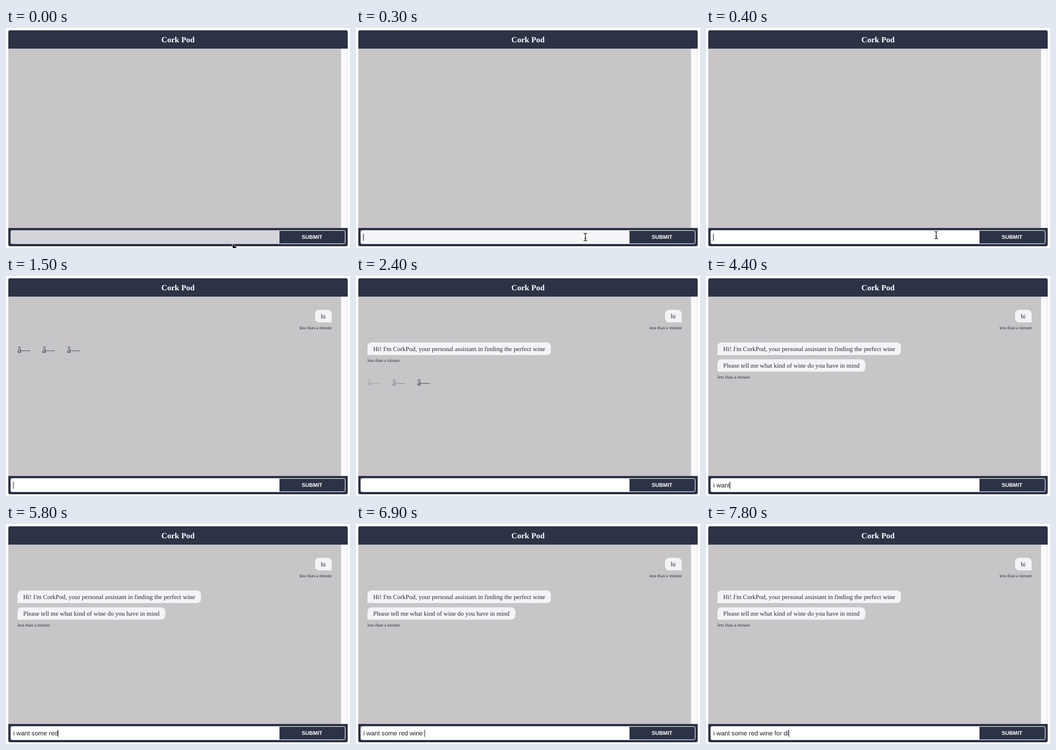
These frames come from a looping animation (600 px wide and 384 px high, 8 s). An HTML page:

```html
<!DOCTYPE html>
<html lang="en">
<head>
<meta charset="utf-8">
<title>Cork Pod</title>
<style>
  html, body { margin: 0; width: 100%; height: 100%; overflow: hidden; background: #fff; }
  svg { display: block; width: 600px; height: 384px; }
  text { text-rendering: geometricPrecision; white-space: pre; }
  .serif { font-family: "Liberation Serif", "Times New Roman", serif; }
  .sans { font-family: "Liberation Sans", Arial, sans-serif; }
  .msg { font-size: 11.05px; fill: #292b38; }
  .time { font-size: 7.85px; fill: #2e2e36; }
  .dot { font-size: 15.3px; fill: #2d3446; }
  .bubble { fill: #f4f3f6; }
</style>
</head>
<body>
<svg viewBox="0 0 600 384">
  <rect width="600" height="384" fill="#fff"/>
  <rect x="584" y="36" width="12" height="313" fill="#faf9fb"/>
  <path d="M584.5 36V349M595.5 36V349" stroke="#e6e4e8"/>
  <rect x="4" y="36" width="580" height="313" fill="#c7c5c8"/>
  <path d="M4 36V7q0-3 3-3H593q3 0 3 3V36Z" fill="#2d3346"/>
  <path d="M4 349H596V378q0 3-3 3H7q-3 0-3-3Z" fill="#2d3346"/>
  <text class="serif" x="300" y="24.5" font-size="14" font-weight="700" fill="#fff" text-anchor="middle">Cork Pod</text>

  <g class="serif">
    <g id="user">
      <path class="bubble" d="M547 59H560q8 0 8 8V81H547q-8 0-8-8V67q0-8 8-8Z"/>
      <text class="msg" x="549" y="73.5">hi</text>
      <text class="time" x="568.3" y="92.5" text-anchor="end">less than a minute</text>
    </g>
    <g id="hello">
      <path class="bubble" d="M20 138V124q0-8 8-8H332q8 0 8 8V130q0 8-8 8Z"/>
      <text class="msg" x="30" y="130.5">Hi! I'm CorkPod, your personal assistant in finding the perfect wine</text>
    </g>
    <g id="ask">
      <path class="bubble" d="M20 167V153.500q0-8 8-8H270q8 0 8 8V159q0 8-8 8Z"/>
      <text class="msg" x="30" y="160">Please tell me what kind of wine do you have in mind</text>
    </g>
    <text id="stamp" class="time" x="20" y="149.500">less than a minute</text>
    <g id="dots">
      <text class="dot" x="20" y="134">â—</text>
      <text class="dot" x="63.2" y="134">â—</text>
      <text class="dot" x="106.4" y="134">â—</text>
    </g>
  </g>

  <path id="field" d="M477 353V377H11q-3 0-3-3V356q0-3 3-3Z"/>
  <path d="M477 353.500H589q2.500 0 2.500 2.500V374q0 2.500-2.500 2.500H477" fill="none" stroke="#f2f1f5"/>
  <text class="sans" x="533.8" y="368.300" font-size="9.4" font-weight="700" fill="#fff" text-anchor="middle">SUBMIT</text>
  <text id="typed" class="sans" x="12.7" y="369" font-size="11.05" fill="#1c1c26"></text>
  <rect id="caret" y="359" width="1" height="12.500" fill="#22242f"/>

  <path id="arrow" d="M395 376V391L398.500 388L401 393L403 392L401 387H406Z" fill="#000" stroke="#fff" stroke-width=".8"/>
  <path id="beam" d="M-3-6.500Q-.5-6.500 0-5Q.5-6.500 3-6.500M0-5V5M-3 6.500Q-.5 6.500 0 5Q.5 6.500 3 6.500M-1.500 2H1.500" fill="none" stroke="#111" stroke-width="1.100"/>
</svg>
<script>
const LOOP = 8000;
const FIRST = 1200, SENT = 1500, HELLO = 2000, ASK = 2500, WRITE = 3100;
const PHRASE = "i want some red wine for di";
// [time, number of characters present]
const KEYS = [
  [3100, 1], [3300, 2], [3800, 3], [3900, 4], [4000, 5], [4400, 6], [4500, 7],
  [4700, 8], [4800, 9], [4900, 10], [5100, 11], [5200, 12],
  [5600, 13], [5700, 14], [5800, 15], [6000, 16], [6100, 17], [6300, 19],
  [6700, 20], [6900, 21], [7100, 22], [7200, 23], [7300, 24], [7500, 25],
  [7700, 26], [7800, 27]
];

const el = id => document.getElementById(id);
const show = (id, on) => el(id).setAttribute("display", on ? "inline" : "none");
const clamp = v => Math.max(0, Math.min(1, v));
const mix = (a, b, p) => a + (b - a) * p;
const ease = p => 1 - Math.pow(1 - p, 2.2);

function textAt(t) {
  if (t < FIRST) return "";
  if (t < SENT) return t < 1300 ? "h" : "hi";
  let count = 0;
  for (const [time, n] of KEYS) if (t >= time) count = n;
  return PHRASE.slice(0, count);
}

function caretOn(t) {
  if (t < 300) return false;
  if (t < FIRST) return t < 800;
  if (t >= SENT && t < WRITE) return (t - SENT) % 1000 < 500;
  return true;
}

// One second blink: fade down, then back up
function blink(ms) {
  if (ms <= 0) return 1;
  const p = (ms % 1000) / 500;
  const faded = p < 1 ? ease(p) : 1 - ease(p - 1);
  return 1 - 0.75 * faded;
}

function drawDots(t) {
  const second = t >= HELLO;
  const start = second ? 1950 : 1600;
  show("dots", t >= SENT && t < ASK);
  el("dots").setAttribute("transform", `translate(0 ${second ? 57 : 0})`);
  [...el("dots").children].forEach((dot, i) =>
    dot.setAttribute("opacity", blink(t - start - i * 250)));
}

function drawField(t) {
  const p = clamp(t / 400);
  const [r, g, b] = [213, 212, 218].map(c => Math.round(mix(c, 255, p)));
  el("field").setAttribute("fill", `rgb(${r},${g},${b})`);

  const typed = el("typed");
  const text = textAt(t).replace(/ /g, "\u00a0");
  if (typed.textContent !== text) typed.textContent = text;
  const width = text ? typed.getComputedTextLength() : 0;
  el("caret").setAttribute("x", 12.5 + width);
  show("caret", caretOn(t));
}

function drawPointer(t) {
  const p = clamp(t / 400);
  show("arrow", t < 100);
  show("beam", t >= 100 && t < FIRST);
  el("beam").setAttribute("transform", `translate(${mix(396, 401.5, p)} ${mix(375, 361.5, p)})`);
}

function draw(t) {
  show("user", t >= SENT);
  show("hello", t >= HELLO);
  show("ask", t >= ASK);
  show("stamp", t >= HELLO);
  el("stamp").setAttribute("y", t < ASK ? 149.5 : 178.5);
  drawDots(t);
  drawField(t);
  drawPointer(t);
}

const begin = performance.now();
function tick() {
  draw((performance.now() - begin) % LOOP);
  requestAnimationFrame(tick);
}
tick();
</script>
</body>
</html>
```
